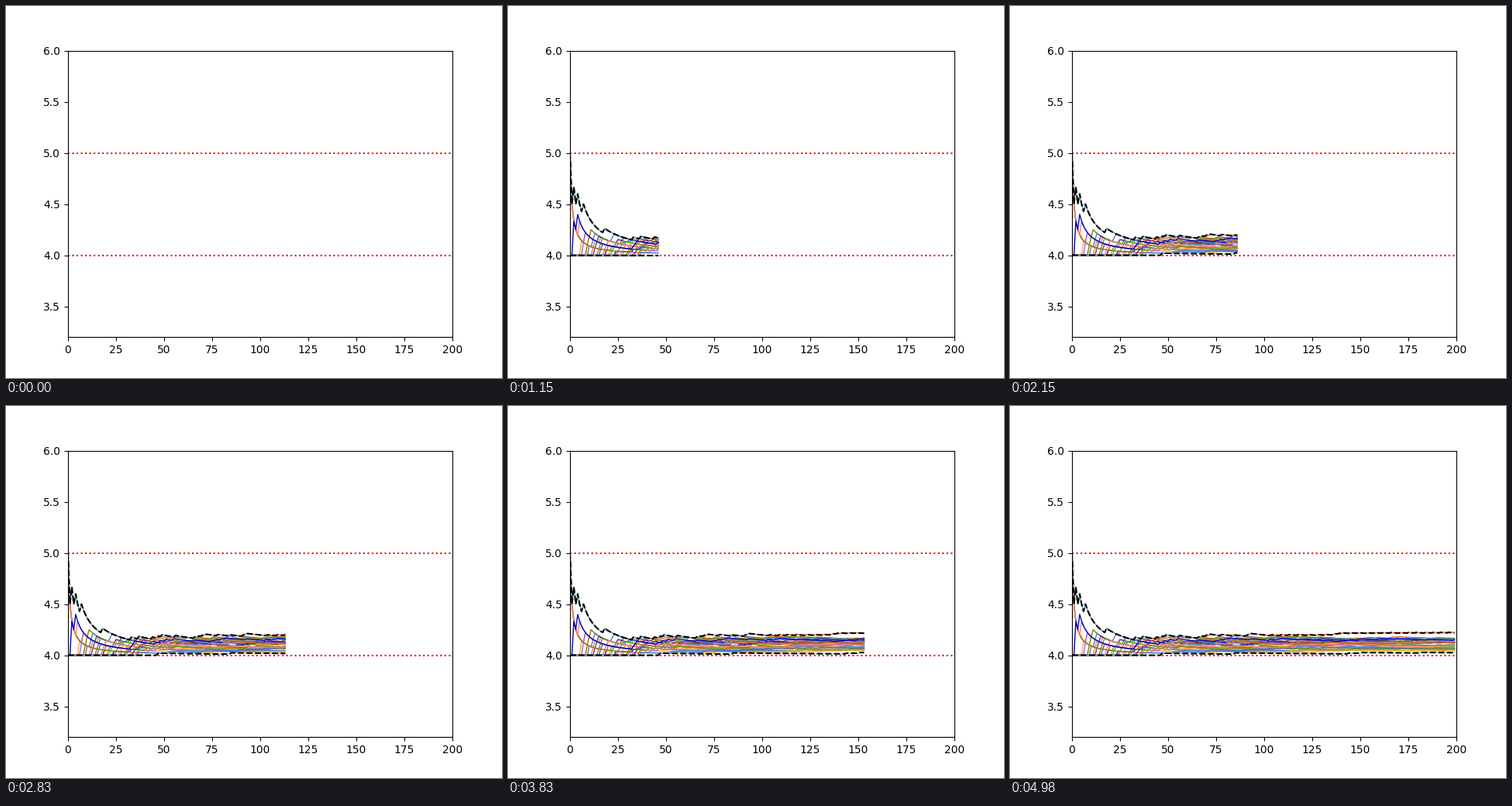
Animation of 640 by 480 pixels, one loop 5.01 s. Source, as a matplotlib script:

```python
import numpy as np
import matplotlib.pyplot as plt
from matplotlib.animation import FuncAnimation

STEPS = 200
FRAMES, INTERVAL = 334, 15
RUNS = 23
PALETTE = ["sandybrown", "mediumpurple", "olive", "steelblue", "coral",
           "darkslateblue", "olivedrab", "royalblue", "rosybrown", "indigo",
           "goldenrod", "limegreen", "mediumblue", "chocolate"]
rng = np.random.default_rng(12)
t = np.arange(STEPS)


def simulate(is_hit):
    """Share of hits so far, where is_hit decides each step."""
    count, shares = 0, []
    for step in range(STEPS):
        count += bool(is_hit(step, count))
        shares.append(count / (step + 1))
    return np.array(shares)


def stay_above(floor):
    """Run that only hits when its share would fall below the floor."""
    return simulate(lambda step, count: count / (step + 1) < floor[step])


# The highest run decays quickly, then hovers around a slowly rising level
high_floor = np.maximum(
    np.minimum(0.5, 0.13 + 0.508 * np.exp(-t / 9.87)),
    np.interp(t, [35, 44, 49, 56, 66, 72, 90, 93, 103, 134, 141, 199],
              [.159, .157, .181, .176, .165, .193, .186, .205, .192, .196,
               .213, .219], left=0))
low_floor = np.interp(t, [46, 85, 144, 151, 199],
                      [0, .0117, .0139, .02, .023])
top, bottom = stay_above(high_floor), stay_above(low_floor)


def random_run(first_hits, rate):
    """Given first hits, then random ones that settle around the rate."""
    def is_hit(step, count):
        if step <= max(first_hits):
            return step in first_hits
        share = count / (step + 1)
        lucky = rng.random() < rate + 2 * (rate - share)
        fits = (count + 1) / (step + 1) <= top[step]
        return share < bottom[step] or lucky and fits
    return simulate(is_hit)


curves = [("lightgreen", bottom), ("cadetblue", top)]
curves.append(("coral", stay_above(np.where(t < 66, 0.12, high_floor))))
for i in range(RUNS):
    start = 6 + 3 * i // 2
    burst = range(start, start + 1 + i % 3)
    rate = 0.04 + 0.13 * (7 * i % RUNS) / (RUNS - 1)
    curves.append((PALETTE[i % len(PALETTE)], random_run(burst, rate)))
curves += [
    ("steelblue", random_run([0, 14], 0.15)),
    ("olive", random_run([0, 32], 0.10)),
    ("chocolate", random_run([0, 20], 0.12)),
    ("salmon", random_run([0, 5], 0.09)),
    ("mediumblue", random_run([2, 4, 33], 0.15)),
]
values = 4 + np.array([curve for _, curve in curves])

fig, ax = plt.subplots(figsize=(6.4, 4.8), dpi=100)
ax.set_xlim(0, STEPS)
ax.set_ylim(3.2, 6)
for level in (4, 5):
    ax.axhline(level, color="red", linestyle=":")

lines = [ax.plot([], [], color=colour, linewidth=1)[0] for colour, _ in curves]
lines += [ax.plot([], [], "k--")[0] for _ in range(2)]
series = [*values, values.max(axis=0), values.min(axis=0)]


def step_at(ms):
    """Steps last 30 and 20 ms in turn."""
    pairs, rest = divmod(ms, 50)
    return min(2 * pairs + (rest >= 30), STEPS - 1)


def update(frame):
    end = step_at(frame * INTERVAL + 10) + 1
    for line, y in zip(lines, series):
        line.set_data(t[:end], y[:end])
    return lines


anim = FuncAnimation(fig, update, frames=FRAMES, interval=INTERVAL,
                     init_func=lambda: update(0), repeat=True, repeat_delay=0)
plt.show()
```
